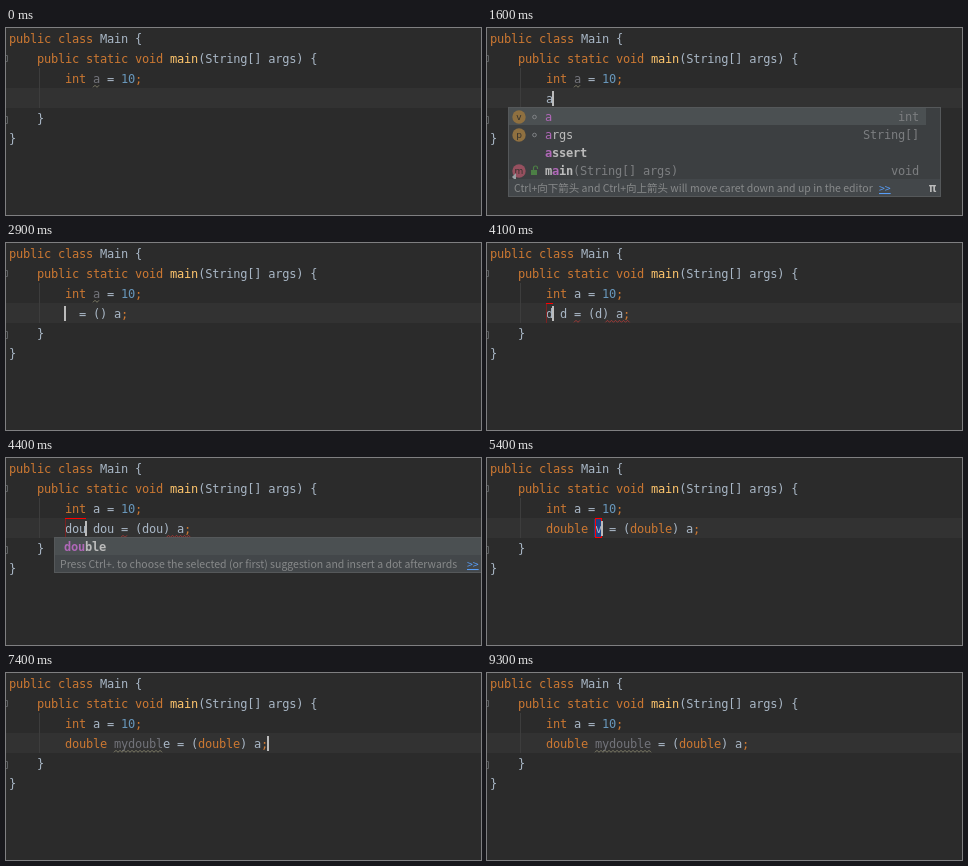
An HTML page for the animation above (9400 ms loop, 475 by 187 pixels).

```html
<!DOCTYPE html>
<html lang="en">
<head>
<meta charset="utf-8">
<title>Postfix completion</title>
<style>
  html, body { margin: 0; width: 100%; height: 100%; overflow: hidden; background: #2b2b2b; }
  svg { display: block; }
  text { white-space: pre; font: 12px "DejaVu Sans Mono", monospace; letter-spacing: -.224px; fill: #a9b7c6; }
  .key { fill: #cc7832; }
  .num { fill: #6897bb; }
  .fn { fill: #ffc66d; }
  .unused { fill: #72737a; }
  .item { fill: #bbb; }
  .hit { fill: #b068b8; }
  .type { fill: #7c7e80; }
  .bold { font-weight: bold; }
  .hint { font: 10.5px "Noto Sans CJK SC", "Open Sans", sans-serif; letter-spacing: 0; fill: #87898a; }
  .link { fill: #589df6; text-decoration: underline; }
  .icon { font: 9px "DejaVu Sans", sans-serif; letter-spacing: 0; fill: #33302c; text-anchor: middle; }
</style>
</head>
<body>
<svg id="stage" width="475" height="187" viewBox="0 0 475 187"></svg>
<script>
const LOOP = 9400, LEFT = 3, CHAR = 7, LINE = 20, ROW = 18, POP_TOP = 79;
const stage = document.getElementById('stage');
const colX = col => LEFT + col * CHAR;

const esc = s => s.replace(/&/g, '&amp;').replace(/</g, '&lt;');
const rect = (x, y, w, h, fill) => `<rect x="${x}" y="${y}" width="${w}" height="${h}" fill="${fill}"/>`;
const frame = (x, y, w, h, stroke) =>
  `<rect x="${x + .5}" y="${y + .5}" width="${w - 1}" height="${h - 1}" fill="none" stroke="${stroke}"/>`;
const text = (x, y, body, cls = '', extra = '') => `<text x="${x}" y="${y}" class="${cls}" ${extra}>${body}</text>`;
const span = (cls, s) => `<tspan class="${cls}">${s}</tspan>`;

function wave(from, to, line, color) {
  const base = line * LINE + 19.3;
  let d = '';
  for (let x = colX(from), i = 0; x <= colX(to); x += 2, i++) {
    d += `${i ? 'L' : 'M'}${x} ${base - (i % 2) * 2}`;
  }
  return `<path d="${d}" fill="none" stroke="${color}" stroke-width=".9"/>`;
}

// Names between tildes are unused: grey with a wavy underline.
const TOKENS = /~(\w+)~|\b(public|class|static|void|int|double)\b|(;)|\b(\d+)\b|\b(main)\b/g;
function codeLine(line, code) {
  const body = code.replace(TOKENS, (all, unused, key, semi, num, fn) =>
    unused ? span('unused', unused) :
    key || semi ? span('key', all) :
    num ? span('num', num) : span('fn', fn));
  const start = code.indexOf('~');
  const len = code.lastIndexOf('~') - start - 1;
  return text(LEFT, line * LINE + 15, body) +
    (start < 0 ? '' : wave(start, start + len, line, '#85836c'));
}

function popup(x, width, rows, content, selectWidth = width) {
  return rect(x, POP_TOP, width, rows * ROW, '#3c3f41') +
    rect(x, POP_TOP, selectWidth, ROW, '#4b5052') + content +
    frame(x, POP_TOP, width + 1, rows * ROW, '#55585a');
}
function item(row, x, label, right, type, cls = '') {
  const y = POP_TOP + row * ROW + 14;
  return text(x, y, label, 'item ' + cls) +
    (type ? text(right, y, esc(type), 'type', 'text-anchor="end"') : '');
}
function hint(row, x, message, linkX) {
  const top = POP_TOP + row * ROW, y = top + 13;
  return rect(x - 6, top, 475, ROW, '#43474a') +
    text(x, y, message, 'hint') + text(linkX, y, '&gt;&gt;', 'hint link');
}
function badge(row, letter, fill) {
  const y = POP_TOP + row * ROW + 10;
  return `<circle cx="32" cy="${y}" r="6.7" fill="${fill}"/>` + text(32, y + 3, letter, 'icon');
}
const ring = row =>
  `<circle cx="47.5" cy="${POP_TOP + row * ROW + 10}" r="1.8" fill="none" stroke="#808386"/>`;
const lock = y =>
  rect(44, y - 1, 6, 5, '#4c7f45') +
  `<path d="M46.5 ${y - 1}v-2a2 2 0 0 1 4 0v1" fill="none" stroke="#4c7f45" stroke-width="1.2"/>`;

function postfixPopup(rows) {
  return popup(55, 420, rows.length,
    rows.map(([name, sample], i) => item(i, 64, name, 466, sample)).join(''));
}

const CAST = ['cast', '((SomeType) expr)'];
const CASTVAR = ['castvar', 'T name = (T)expr'];
const hitA = span('hit', 'a');

const clipNames = '<clipPath id="names"><rect x="21" y="79" width="433" height="90"/></clipPath>';
const popups = {
  names: () => clipNames + '<g clip-path="url(#names)">' + popup(21, 432, 5,
    badge(0, 'v', '#8f7040') + ring(0) + item(0, 58, hitA, 432, 'int') +
    badge(1, 'p', '#8f7040') + ring(1) + item(1, 58, hitA + 'rgs', 432, 'String[]') +
    item(2, 58, hitA + 'ssert', 0, '', 'bold') +
    badge(3, 'm', '#96505f') + '<path d="M25 149l4-4v8z" fill="#9aa0a3"/>' + lock(143) +
    item(3, 58, span('bold', 'm' + hitA + 'in') + span('type', '(String[] args)'), 432, 'void') +
    hint(4, 27, 'Ctrl+向下箭头 and Ctrl+向上箭头 will move caret down and up in the editor', 392) +
    text(442, 164, 'π', 'item bold'), 418) + '</g>',
  all: () => postfixPopup([
    ['arg', 'functionCall(expr)'], CAST, CASTVAR,
    ['field', 'myField = expr'], ['fori', 'for (int i = 0; i < expr; i++)'], ['par', '(expr)']
  ]),
  cast: () => postfixPopup([CASTVAR, CAST, ['soutv', 'System.out.println(expr)']]),
  castTip: () => popups.cast() + '<circle cx="477" cy="90" r="5" fill="#a8975a"/>',
  type: () => popup(48, 427, 2,
    item(0, 58, span('hit', 'dou') + 'ble', 0, '', 'bold') +
    hint(1, 54, 'Press Ctrl+. to choose the selected (or first) suggestion and insert a dot afterwards', 461))
};

// [start ms, edited line, caret column in it (-1 hidden), options]
const cast = (type, name) => `${type} ${name} = (${type}) a;`;
const nameStep = (t, name, more) => {
  const len = name.replace(/~/g, '').length;
  return [t, cast('double', name), 7 + len, { box: [7, len], ...more }];
};
const typeStep = (t, s, more) => [t, cast(s, s), s.length, { top: s.length, err: true, ...more }];
const done = cast('double', '~mydouble~');
const steps = [
  [0, '', -1, { fresh: true }],
  [400, '', 0, { fresh: true }],
  [1300, '', -1, { fresh: true }],
  [1500, 'a', 1, { fresh: true }],
  [1600, 'a', 1, { fresh: true, popup: 'names' }],
  [1700, 'a.', 2, { fresh: true, popup: 'all' }],
  [2100, 'a.c', 3, { fresh: true, popup: 'cast' }],
  [2700, 'a.c', 3, { fresh: true, popup: 'castTip' }],
  [2900, cast('', ''), 0, { fresh: true }],
  [3200, cast('', ''), 0, { err: true }],
  [4000, 'd  = () a;', 1, { top: 1, err: true }],
  typeStep(4100, 'd'),
  typeStep(4200, 'do'),
  typeStep(4300, 'dou'),
  typeStep(4400, 'dou', { popup: 'type' }),
  [4700, cast('double', 'dou'), 6, { top: 6 }],
  nameStep(5400, 'v', { selected: true }),
  nameStep(6000, 'm'),
  nameStep(6200, 'my'),
  nameStep(6300, '~my~'),
  nameStep(6500, '~my~d'),
  nameStep(6600, '~my~dou'),
  nameStep(6800, '~mydou~'),
  nameStep(6900, '~mydou~bl'),
  nameStep(7100, '~mydoubl~e'),
  [7400, cast('double', '~mydoubl~e'), 29, {}],
  [7500, done, 29, {}],
  [8600, done, -1, {}],
  [9100, done, 29, {}],
  [9300, done, -1, {}]
];

function errors(code) {
  const eq = code.indexOf('=') + 8, close = code.indexOf(')') + 8;
  return wave(eq, eq + 1, 3, '#a83a37') + wave(close + .5, code.length + 8, 3, '#a83a37');
}

function draw([, code, caret, opt]) {
  const box = opt.box;
  let out = rect(0, 0, 475, 187, '#2b2b2b') + rect(0, 60, 475, 20, '#323232') +
    rect(33, 40, 1, 40, '#3d3d3d') +
    '<path d="M0 27.5H1.5V33.5H0M0 88.5H1.5V95.5H0" fill="none" stroke="#5c5f61"/>';
  if (opt.selected) out += rect(colX(8 + box[0]) - 1, 61, box[1] * CHAR, 18, '#214283');
  out += [
    'public class Main {',
    '    public static void main(String[] args) {',
    `        int ${opt.fresh ? '~a~' : 'a'} = 10;`,
    '        ' + code,
    '    }',
    '}'
  ].map((s, i) => codeLine(i, s)).join('');
  if (opt.err) out += errors(code);
  if (opt.top) {
    out += rect(59, 60, 1, 20, '#7a2222') + rect(59, 60, opt.top * CHAR, 1, '#f00');
  }
  if (box) out += frame(colX(8 + box[0]), 60, box[1] * CHAR, 20, '#f00');
  if (caret >= 0) out += rect(colX(8 + caret) - 1, 63, 2, 15, '#bbb');
  if (opt.popup) out += popups[opt.popup]();
  stage.innerHTML = out;
}

let shown = null;
const began = performance.now();
function tick() {
  const t = (performance.now() - began) % LOOP;
  const step = steps.findLast(s => s[0] <= t);
  if (step !== shown) draw(shown = step);
  requestAnimationFrame(tick);
}
tick();
</script>
</body>
</html>
```
